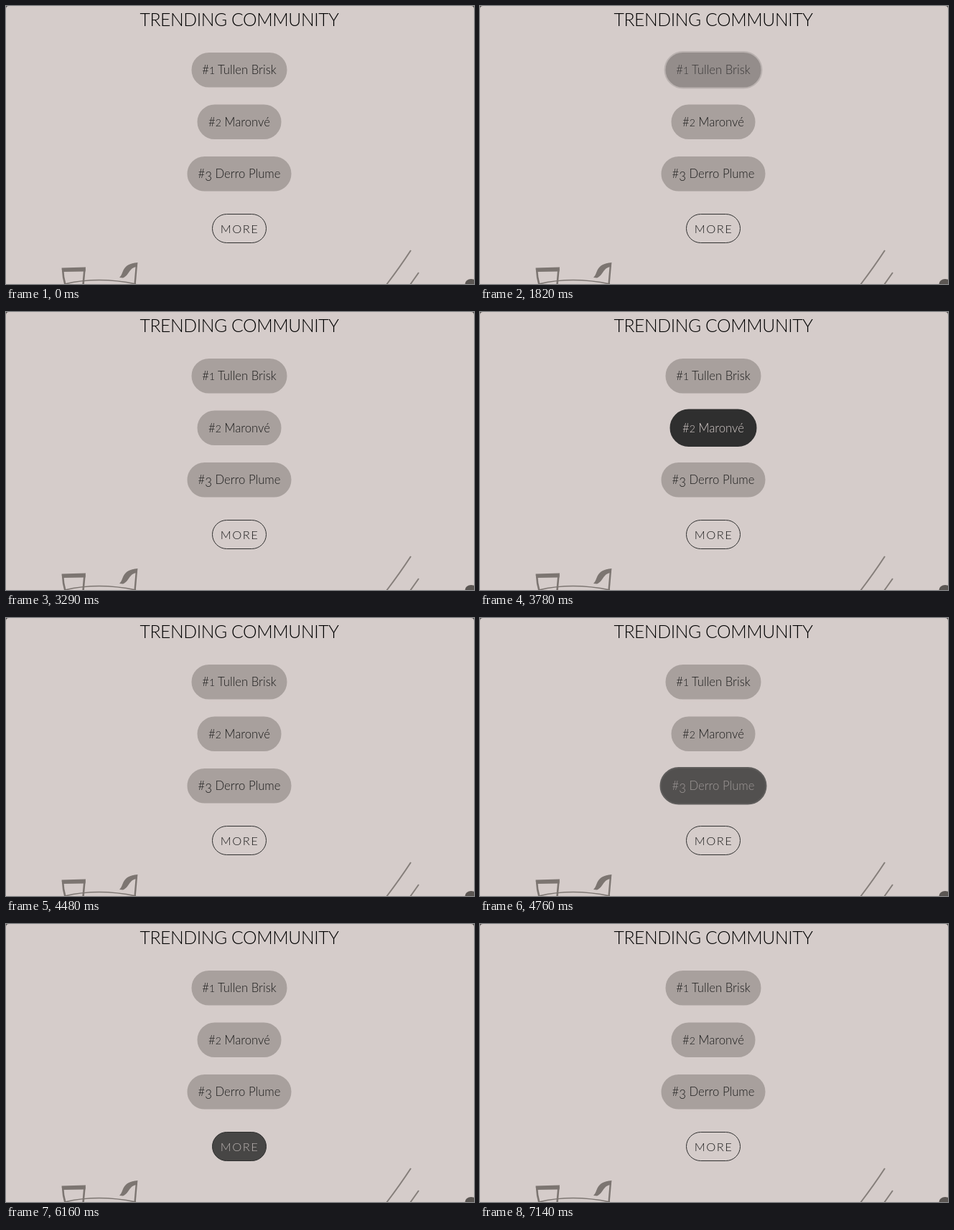
These frames come from a looping animation (652 by 388 pixels, 7770 ms). An HTML page:

```html
<!DOCTYPE html>
<html lang="en">
<head>
<meta charset="utf-8">
<title>Trending community</title>
<style>
html, body { margin: 0; width: 100%; height: 100%; overflow: hidden; background: #d5ccca; }
svg { display: block; width: 652px; height: 388px; }
text { font-family: Lato, "Open Sans", sans-serif; font-weight: 300; text-anchor: middle; }
.title { font-size: 24.7px; letter-spacing: -.37px; }
.label { font-size: 16.7px; }
.small { font-size: 14px; }
</style>
</head>
<body>
<svg viewBox="0 0 652 388">
  <defs><filter id="soft"><feGaussianBlur stdDeviation=".7"/></filter></defs>
  <rect width="652" height="388" fill="#d5ccca"/>
  <g fill="none" stroke="#7c7571" stroke-width="2" filter="url(#soft)">
    <path d="M77.5 365.5L111 364.5L110.5 370.5L78.500 371Z" fill="#7c7571" stroke="none"/>
    <path d="M79 367Q79.500 379 82.500 389M109.500 367L107.500 389" stroke-width="2.600"/>
    <path d="M82 388Q128 377 181 388" stroke-width="1.700"/>
    <path d="M158 379C165 373 160 360 183.500 358L182.500 364C171 365 172 376 163 379.500Z" fill="#7c7571" stroke="none"/>
    <path d="M182 360L179.500 389" stroke-width="2.400"/>
    <path d="M564 341Q549 364 530 389M575 372L563 389" stroke="#857e7a"/>
    <ellipse cx="648" cy="388" rx="8.500" ry="7" fill="#5b5653" stroke="none"/>
  </g>
  <path d="M0 0H4Q0 0 0 4ZM652 0H648Q652 0 652 4Z" fill="#4b4846"/>
  <text class="title" x="325" y="28">TRENDING COMMUNITY</text>
  <g id="tags"></g>
  <rect id="moreBox" x="287.500" y="290.500" width="75" height="40" rx="20" stroke="#2f2f2f"/>
  <text id="more" x="325.500" y="316.500" font-size="16.500" letter-spacing="1.500">MORE</text>
</svg>
<script>
const LOOP = 7770, STEP = 70, FADE = 500;
const PAGE = [213, 204, 202], TAG = [168, 160, 157], DARK = [47, 47, 47], INK = [28, 28, 28];

const tags = [
  { y: 65, w: 133, label: '#<tspan class="small">1</tspan> Tullen Brisk', on: 1750, off: 3290 },
  { y: 137.5, w: 117, label: '#<tspan class="small">2</tspan> Maronvé', on: 3290, off: 4480 },
  { y: 210, w: 145, label: '#<tspan dy="3.500">3</tspan><tspan dy="-3.500"> Derro Plume</tspan>', on: 4550, off: 5670 }
];
const more = { on: 5880, off: 7140 };
const byId = id => document.getElementById(id);

byId('tags').innerHTML = tags.map(({ y, w, label }) =>
  `<rect x="${325 - w / 2 - 1}" y="${y - 1}" width="${w + 2}" height="50.500" rx="25.250" stroke-width="2"/>` +
  `<text class="label" x="325" y="${y + 30.3}">${label}</text>`).join('');
const boxes = document.querySelectorAll('#tags rect');
const labels = document.querySelectorAll('#tags text');

// CSS "ease": cubic-bezier(.25, .1, .25, 1)
function ease(x) {
  if (x <= 0 || x >= 1) return x <= 0 ? 0 : 1;
  const curve = (a, b, u) => 3 * a * u * (1 - u) ** 2 + 3 * b * u * u * (1 - u) + u ** 3;
  let lo = 0, hi = 1;
  for (let i = 0; i < 24; i++) {
    const mid = (lo + hi) / 2;
    if (curve(.25, .25, mid) < x) lo = mid; else hi = mid;
  }
  return curve(.1, 1, lo);
}

// Hover fades in, but drops at once.
const hover = ({ on, off }, t) => t < off ? ease((t - on) / FADE) : 0;
const mix = (a, b, p) => `rgb(${a.map((v, i) => Math.round(v + (b[i] - v) * p))})`;

function draw(t) {
  tags.forEach((tag, i) => {
    const p = hover(tag, t);
    boxes[i].setAttribute('fill', mix(TAG, DARK, p));
    boxes[i].setAttribute('stroke', mix(PAGE, DARK, p));
    labels[i].setAttribute('fill', mix(INK, PAGE, p));
  });
  const p = hover(more, t);
  byId('moreBox').setAttribute('fill', mix(PAGE, DARK, p));
  byId('more').setAttribute('fill', mix(INK, PAGE, p));
}

const start = performance.now();
function tick() {
  const t = (performance.now() - start) % LOOP;
  draw(Math.floor(t / STEP) * STEP);
  requestAnimationFrame(tick);
}
tick();
</script>
</body>
</html>
```
